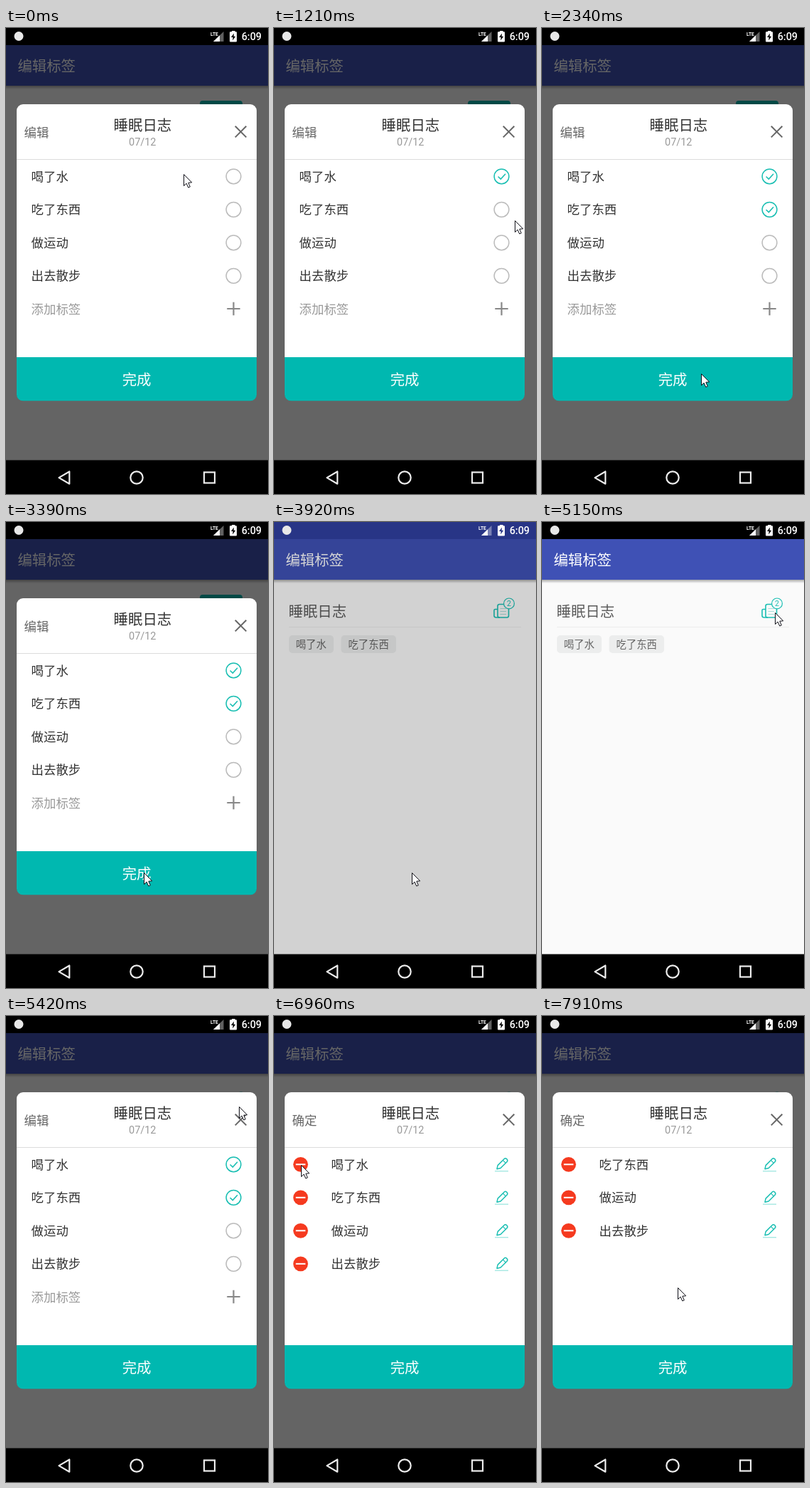
An HTML page with a canvas that plays this animation: 369x654 px, repeating every 8000 ms.

```html
<!DOCTYPE html>
<html lang="zh-CN">
<head>
<meta charset="utf-8">
<title>编辑标签</title>
<style>
html, body { margin: 0; width: 100%; height: 100%; overflow: hidden; background: #000; }
canvas { display: block; width: 369px; height: 654px; }
</style>
</head>
<body>
<canvas id="stage"></canvas>
<script>
const W = 369, H = 654, LOOP = 8000;
const TEAL = '#00b8b0', MINT = '#1bbfb3';
const CJK = '"Noto Sans CJK SC", "Noto Sans CJK", sans-serif';
const LATIN = 'Roboto, sans-serif';
const TAGS = ['喝了水', '吃了东西', '做运动', '出去散步'];
const ROW_Y = 208.3, ROW_H = 46.5;

const canvas = document.getElementById('stage');
const ctx = canvas.getContext('2d');
const dpr = window.devicePixelRatio || 1;
canvas.width = Math.round(W * dpr);
canvas.height = Math.round(H * dpr);

// Pointer moves: start, end, number of steps, target x, y
const MOVES = [
  [120, 390, 3, 320, 212],
  [790, 1165, 4, 339, 270],
  [1290, 1670, 4, 323, 256],
  [1945, 2340, 4, 224, 485],
  [2460, 2760, 3, 209, 495],
  [2880, 3390, 5, 194, 492],
  [4040, 4850, 7, 328, 127],
  [5540, 6050, 5, 44, 142],
  [6455, 6700, 3, 26, 185],
  [6830, 6960, 2, 38, 209],
  [7650, 7910, 3, 191, 381]
];

function ease(p) { return p * p * (3 - 2 * p); }

function pointerAt(t) {
  let x = 250, y = 205;
  for (const [t0, t1, n, tx, ty] of MOVES) {
    if (t < t0) break;
    const gap = (t1 - t0) / (n - 1);
    const k = Math.min(n, Math.floor((t - t0) / gap + 1e-6) + 1);
    const p = ease(k / n);
    x += (tx - x) * p;
    y += (ty - y) * p;
  }
  return [Math.round(x), Math.round(y)];
}

// Picks the last value whose start time has passed
function held(t, ...steps) {
  let v = steps[0][1];
  for (const [at, value] of steps) if (t >= at) v = value;
  return v;
}

function rect(x, y, w, h, color) {
  ctx.fillStyle = color;
  ctx.fillRect(x, y, w, h);
}

function roundRect(x, y, w, h, r) {
  ctx.beginPath();
  ctx.roundRect(x, y, w, h, r);
}

function fillRound(x, y, w, h, r, color) {
  roundRect(x, y, w, h, r);
  ctx.fillStyle = color;
  ctx.fill();
}

function poly(points, close) {
  ctx.beginPath();
  for (const [x, y] of points) ctx.lineTo(x, y);
  if (close) ctx.closePath();
}

function stroke(color, width) {
  ctx.strokeStyle = color;
  ctx.lineWidth = width;
  ctx.stroke();
}

function line(x1, y1, x2, y2, color, width) {
  poly([[x1, y1], [x2, y2]]);
  stroke(color, width);
}

function disc(x, y, r) {
  ctx.beginPath();
  ctx.arc(x, y, r, 0, Math.PI * 2);
}

// y is the optical middle of the glyphs
function han(str, x, y, size, color) {
  ctx.font = `${size}px ${CJK}`;
  ctx.fillStyle = color;
  ctx.fillText(str, x, y + size * 0.38);
}

function latin(str, x, base, font, color, align = 'left') {
  ctx.font = `${font} ${LATIN}`;
  ctx.fillStyle = color;
  ctx.textAlign = align;
  ctx.fillText(str, x, base);
  ctx.textAlign = 'left';
}

function drawPaperIcon() {
  roundRect(315, 115.5, 15.5, 18.5, 2.5);
  stroke(MINT, 1.6);
  ctx.beginPath();
  ctx.moveTo(315, 122.5);
  ctx.lineTo(311.5, 122.5);
  ctx.quadraticCurveTo(310, 122.5, 310, 124);
  ctx.lineTo(310, 131.5);
  ctx.quadraticCurveTo(310, 134, 313, 134);
  ctx.lineTo(318, 134);
  stroke(MINT, 1.6);
  for (const y of [121.5, 125.5, 129.5]) line(318.5, y, 327, y, '#a9dcd8', 1);
  disc(331, 114.4, 7.4);
  ctx.fillStyle = '#fafafa';
  ctx.fill();
  stroke(MINT, 1.2);
  latin('2', 331, 118.2, '10.5px', MINT, 'center');
}

function drawPage(saved, dim) {
  rect(0, 0, W, 607, '#fafafa');
  const shade = ctx.createLinearGradient(0, 81, 0, 86);
  shade.addColorStop(0, 'rgba(0,0,0,.32)');
  shade.addColorStop(1, 'rgba(0,0,0,0)');
  rect(0, 81, W, 5, shade);
  rect(0, 24, W, 57, '#3f51b5');
  han('编辑标签', 16.4, 53, 20.4, '#fff');
  if (saved) {
    han('睡眠日志', 20.5, 125, 20.4, '#5c5c5c');
    rect(21, 147, 327, 1, '#ececec');
    fillRound(21, 159, 63, 25, 5, '#eceded');
    fillRound(94.5, 159, 77.5, 25, 5, '#eceded');
    han(TAGS[0], 30.7, 171.5, 14.35, '#666');
    han(TAGS[1], 104.5, 171.5, 14.35, '#666');
    drawPaperIcon();
  } else {
    fillRound(273, 102, 60, 30, 4, TEAL);
  }
  rect(0, 24, W, 583, `rgba(0,0,0,${dim})`);
}

function drawStatusBar(black, dim) {
  rect(0, 0, W, 24, black ? '#000' : '#303f9f');
  if (!black) rect(0, 0, W, 24, `rgba(0,0,0,${dim})`);
  disc(18, 11.5, 6.5);
  ctx.fillStyle = '#e8e8e8';
  ctx.fill();

  latin('LTE', 288, 10.8, 'bold 6.6px', '#fff');
  poly([[306.5, 5], [306.5, 19], [292, 19]], true);
  ctx.fillStyle = 'rgba(255,255,255,.38)';
  ctx.fill();
  poly([[301, 10.3], [301, 19], [292, 19]], true);
  ctx.fillStyle = '#fff';
  ctx.fill();

  rect(318, 4, 4.5, 2, '#fff');
  fillRound(315, 5.2, 10, 14.3, 1, '#fff');
  poly([[321, 7.5], [317, 13], [319.6, 13], [319.2, 17.5], [323.2, 11.8], [320.6, 11.8]], true);
  ctx.fillStyle = black ? '#000' : '#283586';
  ctx.fill();
  latin('6:09', 360, 17.3, '500 14.4px', '#fff', 'right');
}

function drawNavBar() {
  rect(0, 606.5, W, 48, '#000');
  ctx.lineJoin = 'round';
  poly([[89.3, 622.5], [89.3, 639.7], [74.5, 631.1]], true);
  stroke('#ececec', 2.2);
  disc(184, 631, 8.7);
  stroke('#ececec', 2.2);
  ctx.lineJoin = 'miter';
  ctx.strokeRect(279, 623.5, 15, 15);
}

function drawCheck(y, on) {
  disc(320.5, y, 10.4);
  stroke(on ? MINT : '#bcbcbc', 1.5);
  if (!on) return;
  poly([[315.6, y + 0.2], [319.3, y + 3.8], [326, y - 3.6]]);
  stroke(MINT, 1.6);
}

function drawMinus(x, y) {
  disc(x, y, 10.4);
  ctx.fillStyle = '#f53a1f';
  ctx.fill();
  rect(x - 6.8, y - 1, 13.6, 2, '#fff');
}

function drawPencil(y) {
  rect(311, y + 8.7, 19, 1.4, '#a5e8e2');
  ctx.save();
  ctx.translate(314, y + 6.4);
  ctx.rotate(-Math.PI / 4);
  ctx.lineJoin = 'round';
  ctx.beginPath();
  ctx.moveTo(0, 0);
  ctx.lineTo(4.4, -2.8);
  ctx.lineTo(17, -2.8);
  ctx.quadraticCurveTo(19.6, -2.8, 19.6, 0);
  ctx.quadraticCurveTo(19.6, 2.8, 17, 2.8);
  ctx.lineTo(4.4, 2.8);
  ctx.closePath();
  stroke(MINT, 1.5);
  line(14.6, -2.8, 14.6, 2.8, MINT, 1.2);
  ctx.restore();
}

function drawDialog(t, alpha) {
  const editing = t >= 6330;
  const slide = held(t, [0, 0], [6330, 0.35], [6456, 0.8], [6582, 1]);
  const checked = [t >= 670, t >= 1820];
  const names = t >= 7520 ? TAGS.slice(1) : TAGS;

  ctx.save();
  ctx.globalAlpha = alpha;
  roundRect(15, 107, 338, 416.3, 9);
  ctx.clip();
  rect(15, 107, 338, 355, '#fff');
  rect(15, 462, 338, 62, TEAL);
  rect(15, 184, 338, 1, '#dcdcdc');

  han(editing ? '确定' : '编辑', 25.6, 146, 17.4, '#666');
  han('睡眠日志', 151.6, 136, 20.4, '#333');
  latin('07/12', 192.2, 165, '14.4px', '#999', 'center');
  line(322.8, 137.8, 338.4, 153.4, '#666', 2);
  line(338.4, 137.8, 322.8, 153.4, '#666', 2);

  names.forEach((name, i) => {
    const y = ROW_Y + i * ROW_H;
    han(name, 35.6 + 45 * slide, y, 17.4, '#333');
    if (editing) {
      drawMinus(-7.5 + 45 * slide, y);
      drawPencil(y);
    } else {
      drawCheck(y, checked[i]);
    }
  });

  if (!editing) {
    han('添加标签', 35.6, 394.3, 17.4, '#999');
    line(311.3, 394, 329.7, 394, '#888', 2.2);
    line(320.5, 384.8, 320.5, 403.2, '#888', 2.2);
  }
  han('完成', 163.7, 493, 20.4, '#fff');
  ctx.restore();
}

function drawPointer([x, y]) {
  ctx.save();
  ctx.translate(x + 0.5, y + 0.5);
  poly([[0, 0], [0, 16], [3.6, 12.6], [6.2, 18.4], [8.8, 17.4], [6.3, 11.7], [11.2, 11.3]], true);
  ctx.fillStyle = '#fff';
  ctx.fill();
  stroke('#101018', 1);
  ctx.restore();
}

function draw(t) {
  const saved = t >= 3920;
  const dim = held(t, [0, 0.6], [3920, 0.16], [4040, 0], [5270, 0.42], [5420, 0.6]);
  const alpha = held(t, [0, 1], [3920, 0], [5270, 0.75], [5420, 1]);
  const black = t < 3920 || t >= 5150;

  ctx.setTransform(dpr, 0, 0, dpr, 0, 0);
  drawPage(saved, dim);
  if (alpha > 0) drawDialog(t, alpha);
  drawStatusBar(black, dim);
  drawNavBar();
  drawPointer(pointerAt(t));
}

const start = performance.now();
function tick() {
  draw((performance.now() - start) % LOOP);
  requestAnimationFrame(tick);
}
tick();
</script>
</body>
</html>
```
